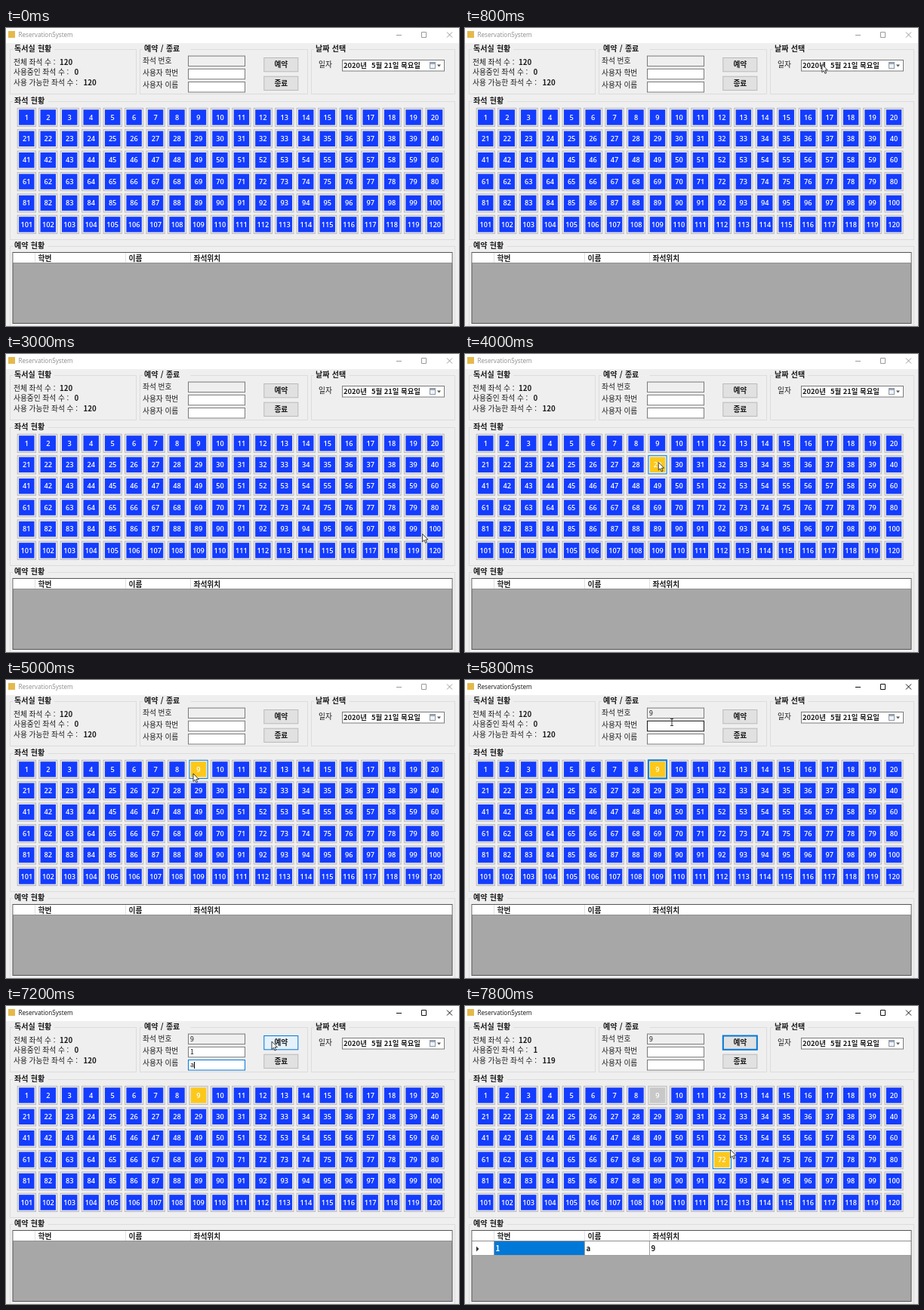
An HTML page that plays this animation: 600 by 395 pixels, repeating every 8 s.

```html
<!DOCTYPE html>
<html lang="ko">
<head>
<meta charset="utf-8">
<title>ReservationSystem</title>
<style>
html, body { margin: 0; width: 100%; height: 100%; overflow: hidden; background: #f0eff0; }
svg { display: block; width: 600px; height: 395px; }
text { font: 9.7px "Noto Sans CJK KR", "Noto Sans CJK", sans-serif; fill: #1a1a1a; white-space: pre; }
.b { font-weight: 700; }
.head { font-weight: 700; font-size: 10px; word-spacing: .5px; }
.date { font-weight: 700; font-size: 9.4px; }
.value { font-size: 8.8px; }
.title { font: 8.15px "Open Sans", sans-serif; }
.seat { font: 600 9.2px "Open Sans", sans-serif; fill: #fff; text-anchor: middle; }
.mid { font-weight: 700; text-anchor: middle; }
</style>
</head>
<body>
<svg id="stage" viewBox="0 0 600 395" xmlns="http://www.w3.org/2000/svg"></svg>
<script>
const LOOP = 8000, STEP = 200;
const FACE = '#f0eff0', BLUE = '#143cff', YELLOW = '#fcc81a', TAKEN = '#c8c8c8';
const ACCENT = '#0078d7', EDGE = '#bababa', FIELD_EDGE = '#7a7a7a';
const PICKED = 5200, BOOKED = 7400;
const stage = document.getElementById('stage');

function set(el, attrs) {
  for (const key in attrs) el.setAttribute(key, attrs[key]);
}
function add(tag, attrs, parent = stage) {
  const el = document.createElementNS('http://www.w3.org/2000/svg', tag);
  set(el, attrs);
  parent.append(el);
  return el;
}
function rect(x, y, width, height, fill, parent) {
  return add('rect', { x, y, width, height, fill }, parent);
}
// Outline one pixel wide, drawn inside the given edges
function box(x, y, w, h, fill, stroke) {
  return add('rect', { x: x + .5, y: y + .5, width: w - 1, height: h - 1, fill, stroke });
}
function label(x, y, str, cls = '', parent) {
  const el = add('text', { x, y, class: cls }, parent);
  el.textContent = str;
  return el;
}
function group(x, y, w, h, title) {
  box(x, y, w, h, 'none', '#dcdcdc');
  rect(x + 4, y - 2, title.length * 8.5 + 4, 5, FACE);
  label(x + 6, y + 3, title, 'head');
}
function show(el, on) {
  el.setAttribute('visibility', on ? 'visible' : 'hidden');
}

// Window
rect(0, 0, 600, 395, FACE);
rect(0, 0, 600, 20, '#fff');
rect(3, 4, 9, 9, '#e5b84b');
const title = label(16.5, 12, 'ReservationSystem', 'title');
const controls = add('path', {
  d: 'M517 9.5h7M550.5 5.5h6v7h-6zM584 5.5l7 7M591 5.5l-7 7', fill: 'none'
});

// Summary
group(5, 28, 168, 60, '독서실 현황');
const [, used, free] = [
  ['전체 좌석 수 :', 71, '120'], ['사용중인 좌석 수 :', 90.5, '0'], ['사용 가능한 좌석 수 :', 102.5, '120']
].map(([name, x, value], i) => {
  const y = 48.5 + 13.5 * i;
  label(10, y, name);
  return label(x, y, value, 'b');
});

// Booking form
group(177, 28, 223, 60, '예약 / 종료');
const fields = ['좌석 번호', '사용자 학번', '사용자 이름'].map((name, i) => {
  const y = 36.6 + 17.2 * i;
  label(181, 46.5 + 16.2 * i, name);
  return {
    y,
    frame: box(241, y, 76, 14.5, i ? '#fff' : FACE, FIELD_EDGE),
    text: label(244, y + 10, ''),
    caret: rect(244, y + 3, 1, 9, '#000')
  };
});
fields.forEach(f => f.text.setAttribute('class', 'value'));
const [reserve] = ['예약', '종료'].map((name, i) => {
  const y = 39 + 24.7 * i;
  const frame = box(341.3, y, 46, 19.3, '#e1e1e1', EDGE);
  label(364.3, y + 13, name, 'mid');
  return frame;
});

// Date picker
group(404, 28, 191, 60, '날짜 선택');
label(414, 52, '일자');
box(445, 42, 136, 15.5, '#fff', FIELD_EDGE);
label(447, 53, '2020년', 'date');
label(484, 53, '5월 21일 목요일', 'date');
box(561, 45, 8, 9, '#eef2f8', '#8f98a4');
rect(562, 46, 6, 2, '#9aa7b8');
add('path', { d: 'M571 48.5h5l-2.5 3z', fill: '#555' });

// Seats
group(5, 97, 590, 184, '좌석 현황');
const seats = Array.from({ length: 120 }, (_, i) => {
  const cx = 27.3 + i % 20 * 28.46, cy = 118.4 + Math.floor(i / 20) * 28.4;
  const seat = {
    cx, cy,
    frame: box(cx - 12.6, cy - 12.6, 25.2, 25.2, '#e9e9e9', EDGE),
    face: rect(cx - 10.2, cy - 10.2, 20.4, 20.4, BLUE)
  };
  label(cx, cy + 3.2, i + 1, 'seat');
  return seat;
});

// Booking list
group(5, 289, 590, 120, '예약 현황');
box(8.5, 297, 583, 95, '#a8a7a8', '#555');
rect(9.5, 298, 581, 13, '#fff');
rect(9.5, 311, 581, 1, '#8f8f8f');
const row = add('g', {});
rect(9.5, 312, 581, 18, '#fff', row);
rect(39, 312, 119, 18, ACCENT, row);
rect(9.5, 330, 581, 1, '#a0a0a0', row);
add('path', { d: 'M15 318.5l3.5 3.5-3.5 3.5z', fill: '#333' }, row);
[[38, '학번', '1'], [158, '이름', 'a'], [244, '좌석위치', '9']].forEach(([x, name, value], i) => {
  rect(x, 298, 1, 13, '#e0e0e0');
  rect(x, 312, 1, 18, '#a0a0a0', row);
  label(x + 4.5, 308.5, name, 'b');
  label(x + 2.5, 325, value, 'b', row).style.fill = i ? '#1a1a1a' : '#fff';
});

// Pointers
const arrow = add('path', {
  d: 'M0 0V10.4L2.4 8.2 4 12 5.7 11.3 4.1 7.6H7.3Z',
  fill: '#fff', stroke: '#111', 'stroke-width': .8
});
const beam = add('path', {
  d: 'M-2 -4.5H2M0 -4.5V4.5M-2 4.5H2', fill: 'none', stroke: '#222', 'stroke-width': .9
});

// Pointer stops: time, x, y
const route = [
  [200, 62, 39], [1000, 549, 50], [1400, 96, 161], [1600, 300, 237], [2200, 477, 262],
  [3000, 551.6, 238.5], [3600, 240, 211], [4200, 262, 120], [5000, 248, 124],
  [PICKED, 248, 124], [5800, 274, 56], [6600, 274, 56], [7200, 352, 47],
  [BOOKED, 352, 47], [7800, 351.6, 190.6]
];
function pointer(t) {
  const i = Math.max(1, route.findIndex(p => p[0] >= t));
  const [t0, x0, y0] = route[i - 1], [t1, x1, y1] = route[i];
  const k = Math.max(0, (t - t0) / (t1 - t0));
  const ease = k * k * (3 - 2 * k);
  return [x0 + (x1 - x0) * ease, y0 + (y1 - y0) * ease];
}

function draw(time) {
  const t = Math.floor(time / STEP) * STEP;
  const [x, y] = pointer(t);
  const visible = t > 0, picked = t >= PICKED, booked = t >= BOOKED;
  const within = (left, top, w, h) =>
    visible && x >= left && x < left + w && y >= top && y < top + h;

  title.style.fill = picked ? '#111' : '#8c8c8c';
  set(controls, { stroke: picked ? '#111' : '#9a9a9a' });
  used.textContent = booked ? 1 : 0;
  free.textContent = booked ? 119 : 120;

  const values = [picked ? '9' : '', t >= 6200 && !booked ? '1' : '', t >= 6600 && !booked ? 'a' : ''];
  const focus = t < 6000 || booked ? -1 : t < 6400 ? 1 : 2;
  const overField = fields.findIndex((f, i) => i && within(241, f.y, 76, 14.5));
  fields.forEach((f, i) => {
    f.text.textContent = values[i];
    show(f.caret, focus === i);
    set(f.caret, { x: values[i] ? 249 : 244 });
    set(f.frame, { stroke: focus === i ? ACCENT : overField === i ? '#171717' : FIELD_EDGE });
  });

  const overButton = within(341, 39, 46, 19);
  set(reserve, {
    fill: overButton ? '#e5f1fb' : '#e1e1e1',
    stroke: overButton || booked ? ACCENT : EDGE,
    'stroke-width': booked ? 2 : 1
  });

  seats.forEach((s, i) => {
    const over = visible && Math.abs(x - s.cx) < 12 && Math.abs(y - s.cy) < 13.4;
    const mine = i === 8 && picked;
    const focused = mine && t < 6000;
    set(s.face, { fill: mine && booked ? TAKEN : mine || over ? YELLOW : BLUE });
    set(s.frame, {
      fill: over ? '#e5f1fb' : '#e9e9e9',
      stroke: over || focused ? ACCENT : EDGE,
      'stroke-width': focused ? 2 : 1
    });
  });

  show(row, booked);
  const typing = t >= 6200 && t < 6800;
  show(arrow, visible && !typing && overField < 0);
  show(beam, overField > 0 && !typing);
  [arrow, beam].forEach(el => set(el, { transform: `translate(${x} ${y})` }));
}

const start = performance.now();
function tick() {
  draw((performance.now() - start) % LOOP);
  requestAnimationFrame(tick);
}
tick();
</script>
</body>
</html>
```
